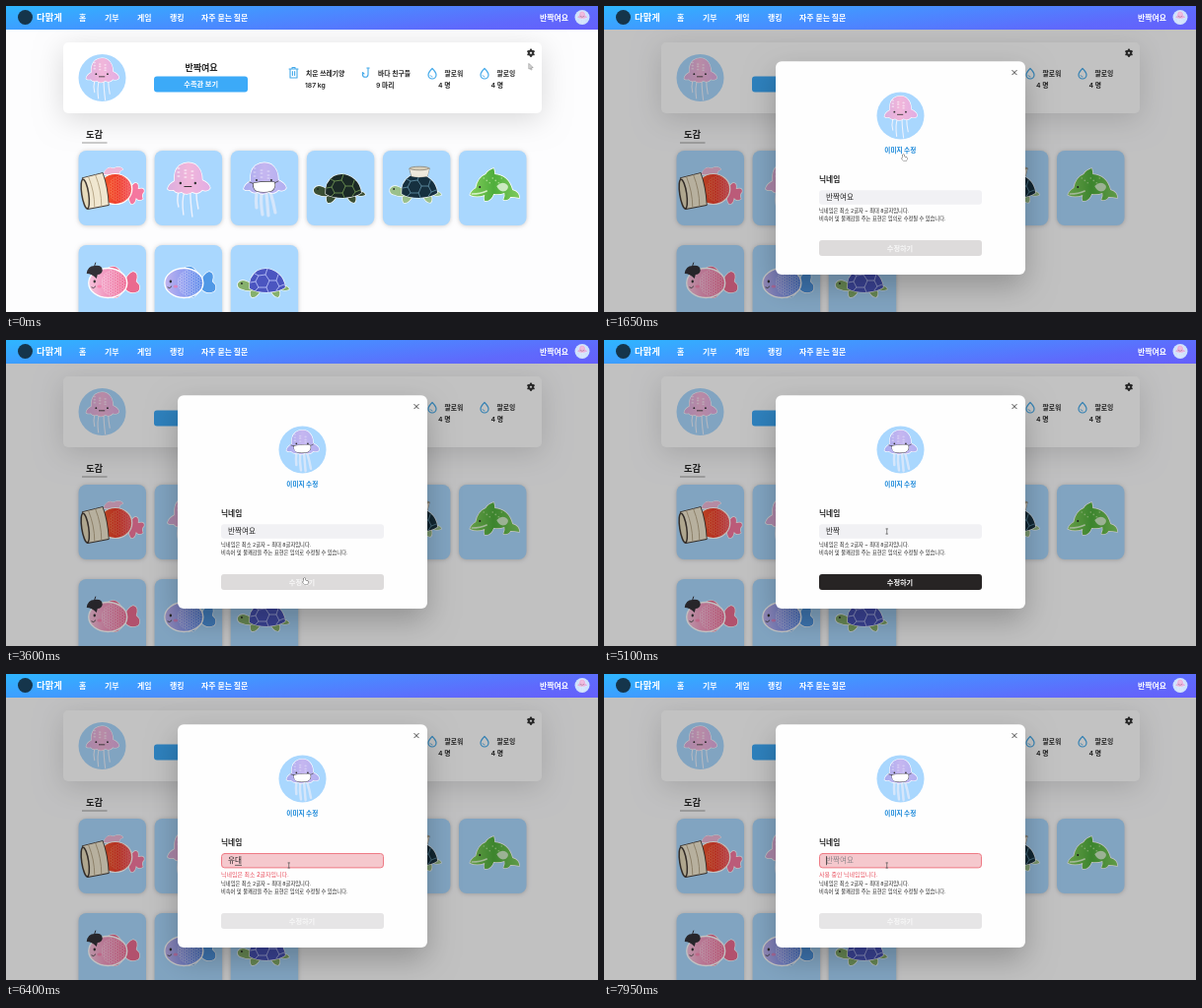
An HTML page with a canvas that plays this animation: 600x311 px, repeating every 8000 ms.

```html
<!DOCTYPE html>
<html lang="ko">
<head>
<meta charset="utf-8">
<title>도감</title>
<style>
html, body { margin: 0; width: 100%; height: 100%; overflow: hidden; background: #fdfdfe; }
canvas { display: block; width: 600px; height: 311px; }
</style>
</head>
<body>
<canvas id="stage"></canvas>
<script>
const LOOP = 8000, W = 600, H = 311;
const FONT = '"Inter", "Noto Sans CJK KR", "Noto Sans CJK", sans-serif';
const SKY = '#a9d7fe', BLUE = '#3caaf8', INK = '#222';
const SITE = '다맑게', USER = '반짝여요';

const canvas = document.getElementById('stage');
const ratio = window.devicePixelRatio || 1;
canvas.width = W * ratio;
canvas.height = H * ratio;
const c = canvas.getContext('2d');

// ---------- helpers ----------
function text(str, x, y, size, color = INK, weight = 600, align = 'left') {
  c.font = `${weight} ${size}px ${FONT}`;
  c.fillStyle = color;
  c.textAlign = align;
  c.fillText(str, x, y + size * 0.36);
}

function box(x, y, w, h, r, fill, stroke) {
  c.beginPath();
  c.roundRect(x, y, w, h, r);
  if (fill) { c.fillStyle = fill; c.fill(); }
  if (stroke) { c.strokeStyle = stroke; c.lineWidth = 1; c.stroke(); }
}

function shadowBox(x, y, w, h, r, fill, dy, blur, alpha) {
  c.save();
  c.shadowColor = `rgba(0,0,0,${alpha})`;
  c.shadowBlur = blur * ratio;
  c.shadowOffsetY = dy * ratio;
  box(x, y, w, h, r, fill);
  c.restore();
}

function oval(x, y, rx, ry, fill, stroke, width = 1, turn = 0) {
  c.beginPath();
  c.ellipse(x, y, rx, ry, turn, 0, Math.PI * 2);
  if (fill) { c.fillStyle = fill; c.fill(); }
  if (stroke) { c.strokeStyle = stroke; c.lineWidth = width; c.stroke(); }
}

function path(d, fill, stroke, width = 1) {
  const p = new Path2D(d);
  c.lineJoin = c.lineCap = 'round';
  if (stroke) { c.strokeStyle = stroke; c.lineWidth = width; c.stroke(p); }
  if (fill) { c.fillStyle = fill; c.fill(p); }
}

function line(d, color, width = 1) { path(d, null, color, width); }

function at(x, y, scale, draw) {
  c.save();
  c.translate(x, y);
  c.scale(scale, scale);
  draw();
  c.restore();
}

function blend(x0, x1, ...colors) {
  const g = c.createLinearGradient(x0, 0, x1, 0);
  colors.forEach((k, i) => g.addColorStop(i / (colors.length - 1), k));
  return g;
}

// Rows of small arcs inside an ellipse
function scales(x, y, rx, ry, color) {
  c.save();
  c.beginPath();
  c.ellipse(x, y, rx, ry, 0, 0, 7);
  c.clip();
  c.strokeStyle = color;
  c.lineWidth = 0.5;
  for (let i = 0, px = x - rx; px < x + rx; px += 2.4, i++) {
    for (let py = y - ry + (i % 2) * 1.4; py < y + ry; py += 2.8) {
      c.beginPath();
      c.arc(px, py, 1.3, -1.3, 1.3);
      c.stroke();
    }
  }
  c.restore();
}

// ---------- sea friends, drawn for a 68px card ----------
function canFish() {
  const red = blend(-8, 20, '#f4582c', '#ee3a2c', '#f2566a');
  path('M17 4Q20-4 23-5Q27-6 26 1Q33-1 32 4Q29 7 31 11Q27 14 24 10Q23 17 19 16Q16 12 17 4Z', '#f5779f', '#fff', 1.4);
  path('M-9-14Q-6-23 1-20Q8-23 11-19Q6-17 7-13Z', '#eeb6d6', '#fff', 1);
  oval(3, 1, 17, 15.5, red, '#fff', 1.2);
  scales(8, 1, 12, 14, 'rgba(255,190,140,.6)');
  path('M-30-10L-10-15Q-5-1-4 17L-25 21Z', '#f0e7d0', '#443b35', 1.8);
  line('M-24-11Q-18 4-18 19M-17-13Q-11 2-11 18', '#b9a98a', 1);
  oval(-27.5, 6, 3.5, 15, '#e6dabb', '#443b35', 1.5, -0.15);
}

function jelly(cap, spots, arms, armColor, armWidth) {
  line(arms, armColor, armWidth);
  path('M-21 1Q-20-4-14-7Q-15-18-9-23Q-1-28 7-24Q14-19 14-8Q21-5 22 0Q20 4 14 2Q10 7 4 4Q-2 8-7 4Q-12 6-15 2Q-19 3-21 1Z', cap, '#fff', 1.4);
  for (let i = 0; i < 9; i++) oval(-10 + (i * 7) % 21, -20 + (i * 5) % 11, 1.6, 1.1, spots);
}

function pinkJelly() {
  jelly(blend(-20, 20, '#dcaede', '#f1b6da', '#e3aee3'), 'rgba(255,255,255,.5)',
    'M-10 4Q-12 12-10 19M-4 4Q-7 12-5 27M2 4Q2 14 4 29M8 3Q8 12 10 21', '#eef2fd', 1.4);
  oval(-8, -5, 1.2, 1.2, '#333');
  oval(7, -5, 1.2, 1.2, '#333');
  line('M-4-1.5H3', '#333', 1.1);
}

function maskJelly() {
  jelly(blend(-20, 20, '#a9abee', '#c5b6f0', '#b3b0f0'), 'rgba(255,255,255,.3)',
    'M-8 5Q-9 13-8 20M-3 5Q-4 15-2 27M2 5Q3 16 4 28M6 4Q9 14 11 25', '#d5e6fb', 3.2);
  oval(-8, -8, 1.1, 1.1, '#333');
  oval(7, -8, 1.1, 1.1, '#333');
  line('M-15-6L-10-4M14-7L10-5', '#444', 0.8);
  path('M-11-5Q0-7 10-6Q12 0 7 3Q-1 5-8 3Q-12 0-11-5Z', '#fff', '#444', 1.2);
}

function turtle(shell, lines, skin) {
  path('M-12 5Q-16 10-13 15Q-8 16-4 8ZM6 7Q9 15 14 15Q17 12 14 6ZM18 3Q25 4 25 7Q21 9 16 7Z', skin, '#fff', 1.2);
  path('M-13 8Q-18 9-22 7Q-28 6-27 1Q-24-4-18-1L-11 2Z', skin, '#fff', 1.2);
  path('M-15 6Q-16-6-7-12Q4-17 14-9Q20-4 21 5Q16 9 3 10Q-9 10-15 6Z', shell, '#fff', 1.2);
  line('M-14 0L-9-1L-6 5L-9 8M-9-1L-6-7L-10-9M-6-7L1-8L5-2L2 5L-6 5M1-8L3-14M5-2L12-2L15 4L12 8M2 5L4 10M12-2L14-8M15 4L20 2', lines, 0.9);
  oval(-23, 1, 0.9, 1, '#222');
}
const darkTurtle = () => turtle('#1b2a26', '#6c9152', '#3a4f35');
const blueTurtle = () => turtle('#4b55c0', '#b6bff7', '#86b06c');
const capTurtle = () => {
  turtle('#16303f', '#5d8ba0', '#9bc08b');
  path('M-7-20L13-20L11-12Q2-10-5-12Z', '#efe9dc', '#8b8578', 0.8);
  oval(3, -20, 10, 1.8, '#d8cfba', '#8b8578', 0.8);
};

function dolphin() {
  path('M-23 7Q-22 3-17 0Q-15-11-7-14Q-5-18 1-20Q2-17 2-14Q16-13 20 2Q27 4 27 10Q22 9 18 9Q16 13 11 12Q13 8 12 5Q7 7 1 6Q-2 14-8 13Q-9 9-8 7Q-16 10-23 7Z', blend(-24, 26, '#86cf5d', '#4fae3c', '#7cc95c'), '#fff', 1.4);
  path('M4-2Q10-8 15-3Q17 0 13 3Q7 5 4-2Z', 'rgba(240,250,235,.75)');
  line('M-21 6Q-12 6-6 3', '#d5f0c6', 1.4);
  oval(-13, -1, 1, 1, '#222');
  for (let i = 0; i < 7; i++) oval(-9 + i * 3, -10 + (i % 3) * 2.4, 0.8, 0.8, '#a7de8c');
}

function fish(tint, fin, beret) {
  path('M12 1Q15-9 21-11Q27-10 24-1Q30 4 26 9Q18 13 12 5Z', fin, '#fff', 1.3);
  path('M-6-13Q1-20 8-12ZM-3 13Q4 19 9 11Z', fin, '#fff', 1.1);
  oval(-4.5, 0.5, 19.5, 15, tint, '#fff', 1.3);
  scales(2, 0.5, 13, 14, 'rgba(255,255,255,.65)');
  oval(-18, -1, 1.2, 1.4, '#333');
  line('M-21 5Q-19 7-17 4', '#444', 0.9);
  oval(-13, 4, 2.3, 1.5, 'rgba(255,110,160,.55)');
  if (beret) {
    path('M-26-9Q-25-17-18-17Q-10-18-10-12Q-11-8-15-8L-16-4Q-21-9-26-9Z', '#333137');
    line('M-18-17L-17-20', '#333137', 1);
  }
}
const pinkFish = () => fish(blend(-24, 15, '#f6c3dc', '#f193bb', '#ee6590'), '#ea6a8f', true);
const blueFish = () => fish(blend(-24, 15, '#c0b3ee', '#8f9cf0', '#5285e8'), '#5098e6', false);

function person() {
  oval(0, -9, 10.5, 10.5, null, '#fff', 2.4);
  line('M-24 25Q-23 6 0 6Q23 6 24 25', '#fff', 2.4);
}

const BOOK = [canFish, pinkJelly, maskJelly, darkTurtle, capTurtle, dolphin, pinkFish, blueFish, blueTurtle];
const PICKS = [person, blueTurtle, blueFish, pinkFish, dolphin, capTurtle, darkTurtle, maskJelly, pinkJelly, canFish];

function grid(list, x, y, dx, dy, w, h, r, scale) {
  list.forEach((draw, i) => {
    const px = x + (i % 6) * dx, py = y + Math.floor(i / 6) * dy;
    shadowBox(px, py, w, h, r, SKY, 0.5, 4, 0.2);
    at(px + w / 2, py + h / 2, scale, draw);
  });
}

function avatar(x, y, r, draw) {
  oval(x, y, r, r, SKY);
  at(x, y, r / 31, draw);
}

// ---------- page ----------
function header() {
  const g = c.createLinearGradient(0, 0, 11.4, 95);
  g.addColorStop(0, '#2eb6ff');
  g.addColorStop(0.5, '#4c87ff');
  g.addColorStop(0.8, '#5f69fc');
  g.addColorStop(1, '#655ffb');
  c.fillStyle = g;
  c.fillRect(0, 0, W, 24);
  oval(19.5, 11.5, 7.5, 7.5, '#15354b');
  text(SITE, 31, 11.7, 9.4, '#fff', 700);
  [['홈', 74], ['기부', 100], ['게임', 133], ['랭킹', 166], ['자주 묻는 질문', 198]]
    .forEach(([s, x]) => text(s, x, 11.7, 7.9, '#fff', 700));
  text(USER, 541, 11.7, 7.9, '#fff', 700);
  oval(584, 11.5, 7.5, 7.5, '#cfe2fc');
  at(584, 11.5, 0.23, pinkJelly);
}

function gear(x, y) {
  c.fillStyle = '#333';
  for (let i = 0; i < 6; i++) {
    c.save();
    c.translate(x, y);
    c.rotate(i * Math.PI / 3);
    c.fillRect(-1, -4.1, 2, 3);
    c.restore();
  }
  oval(x, y, 2.3, 2.3, null, '#333', 1.7);
}

function drop(x, y) {
  path(`M${x} ${y - 5}Q${x + 4} ${y - 1} ${x + 4} ${y + 1.5}A4 4 0 0 1 ${x - 4} ${y + 1.5}Q${x - 4} ${y - 1} ${x} ${y - 5}Z`, null, '#43a9ea', 1.2);
  line(`M${x - 2} ${y + 2}Q${x - 1.5} ${y + 3.5} ${x} ${y + 3.5}`, '#43a9ea', 0.8);
}

function page() {
  c.fillStyle = '#fdfdfe';
  c.fillRect(0, 0, W, H);
  shadowBox(58, 37, 485, 72, 5, '#fff', 6, 28, 0.14);
  avatar(97.5, 73, 24, pinkJelly);
  text(USER, 198, 63, 9, INK, 700, 'center');
  box(150, 71.5, 95, 16, 3, BLUE);
  text('수족관 보기', 197.7, 79.5, 7.2, '#fff', 700, 'center');

  line('M287 64H296M290 64V62.5H293V64M288 64V73H295V64M290.4 66.5V70.5M292.6 66.5V70.5', '#43a9ea', 1.1);
  line('M367 63V69.5A2.8 2.8 0 0 1 361.4 69.5V67.5L363 69M365.8 63H368.2', '#43a9ea', 1.1);
  drop(432, 68.5);
  drop(485, 68.5);
  [['치운 쓰레기양', 304, '187 kg', 303], ['바다 친구들', 377, '9 마리', 375],
   ['팔로워', 444.5, '4 명', 438], ['팔로잉', 497.5, '4 명', 491.5]].forEach(([k, kx, v, vx]) => {
    text(k, kx, 68.1, 6.8);
    text(v, vx, 81, 6.8);
  });
  gear(532, 47.7);

  text('도감', 81, 131, 9.3);
  c.fillStyle = '#999';
  c.fillRect(77, 138.5, 25.5, 1);
  grid(BOOK, 73.5, 147, 77.1, 96, 68.5, 76, 8, 1);
}

// ---------- dialogs ----------
function dialog(x, y, w, h) {
  c.fillStyle = 'rgba(0,0,0,.24)';
  c.fillRect(0, 24, W, H);
  shadowBox(x, y, w, h, 6, '#fefefe', 12, 30, 0.24);
  const cx = x + w - 11, cy = y + 11.3;
  line(`M${cx - 2.2} ${cy - 2.2}l4.4 4.4m0 -4.4l-4.4 4.4`, '#333', 0.9);
}

function picker() {
  dialog(91, 45.3, 420, 238);
  grid(PICKS, 135, 77, 56.4, 70.3, 49.5, 55.5, 6, 0.73);
  box(289.3, 216, 10.8, 13.5, 3, BLUE);
  box(301.2, 216, 10.8, 13.5, 3, BLUE);
  text('<', 294.7, 223, 5.5, '#fff', 600, 'center');
  text('>', 306.6, 223, 5.5, '#fff', 600, 'center');
  box(271.5, 236, 58, 16, 2.5, BLUE);
  text('설정하기', 300.3, 244, 7.1, '#fff', 700, 'center');
}

// Latest value whose start time has passed
function step(t, steps) {
  let value = steps[0][1];
  for (const [from, v] of steps) if (t >= from) value = v;
  return value;
}

const TYPED = [[0, USER], [4800, USER.slice(0, 3)], [5000, USER.slice(0, 2)], [5250, USER.slice(0, 1)],
  [5400, ''], [6050, 'ㅇ'], [6150, '유'], [6250, '윧'], [6350, '유대'], [7300, '유'], [7500, '']];
const ERRORS = [[0, ''], [5400, '닉네임은 최소 2글자입니다.'], [6800, '사용 중인 닉네임입니다.']];

function editor(t) {
  const error = step(t, ERRORS), typed = step(t, TYPED);
  const d = error ? 5 : 0;
  dialog(174, 56.3 - d, 253, 216.7 + 2 * d);
  avatar(300.5, 111.5 - d, 24, t < 3600 ? pinkJelly : maskJelly);
  text('이미지 수정', 300.3, 146.2 - d, 6.6, '#1686d9', 700, 'center');
  text('닉네임', 218, 176.5 - d, 7.7);

  const y = 187.2 - d;
  if (error) box(218.5, y + 0.3, 164, 14.4, 3, '#f5c8cd', '#ee7a85');
  else box(218, y, 165, 14.5, 3, '#f1f1f4');
  text(typed || USER, 225, y + 7.4, 7.6, typed ? INK : '#8d868b', 500);
  if (!typed) {
    c.fillStyle = '#333';
    c.fillRect(225, y + 3, 0.8, 9);
  } else if (t >= 6000) {
    const end = 225 + c.measureText(typed).width;
    c.fillStyle = '#333';
    c.fillRect(end - 7, y + 11.7, 7, 0.7);
  }
  if (error) text(error, 218, 203.7, 5.95, '#e94c5b', 500);
  text('닉네임은 최소 2글자 ~ 최대 8글자입니다.', 218, 207.8 + d, 5.25, '#222', 400);
  text('비속어 및 불쾌감을 주는 표현은 임의로 수정될 수 있습니다.', 218, 216.4 + d, 5.22, '#222', 400);

  const ready = t >= 5000 && !error;
  box(218, 238 + d, 165, 16, 3, ready ? '#272424' : error ? '#e6e5e6' : '#dddbdb');
  text('수정하기', 300, 246 + d, 7.2, ready ? '#fff' : '#f7f7f7', 700, 'center');
}

// ---------- pointer ----------
const ROUTE = [[0, 530, 59], [100, 530, 59], [550, 532, 46], [800, 532, 46], [1550, 303, 150], [1650, 303, 151],
  [2000, 303, 151], [2350, 280, 178], [2600, 262, 180], [2800, 190, 176], [2900, 169, 172], [3080, 213, 180],
  [3400, 302, 242], [3700, 302, 242], [4250, 286.7, 194.5], [LOOP, 286.7, 194.5]];

function pointerAt(t) {
  const i = ROUTE.findIndex(p => p[0] > t);
  const [t0, x0, y0] = ROUTE[i - 1], [t1, x1, y1] = ROUTE[i];
  const u = (t - t0) / (t1 - t0), e = u * u * (3 - 2 * u);
  return [x0 + (x1 - x0) * e, y0 + (y1 - y0) * e];
}

function pointer(t) {
  const [x, y] = pointerAt(t);
  const shape = step(t, [[0, 'arrow'], [450, 'hand'], [850, 'arrow'], [1480, 'hand'], [4080, 'beam']]);
  at(x, y, 0.85, () => {
    if (shape === 'beam') line('M-1 -3H1M0 -3V3M-1 3H1', '#555', 0.8);
    else if (shape === 'hand') path('M0 0Q1 -1 1.6 0V2.6L4.6 3.4Q5.2 5.5 4 7.5H.8L-1.6 4.4Q-1.3 3.3 0 4.2Z', '#fff', '#444', 1);
    else path('M0 0V6L1.5 4.7L2.5 7L3.5 6.5L2.5 4.3H4.3Z', '#ccc', '#777', 0.9);
  });
}

function frame(now) {
  const t = now % LOOP;
  c.setTransform(ratio, 0, 0, ratio, 0, 0);
  page();
  if (t >= 1950 && t < 3600) picker();
  else if (t >= 750) editor(t);
  header();
  pointer(t);
}

const start = performance.now();
function tick() {
  frame(performance.now() - start);
  requestAnimationFrame(tick);
}
tick();
</script>
</body>
</html>
```
